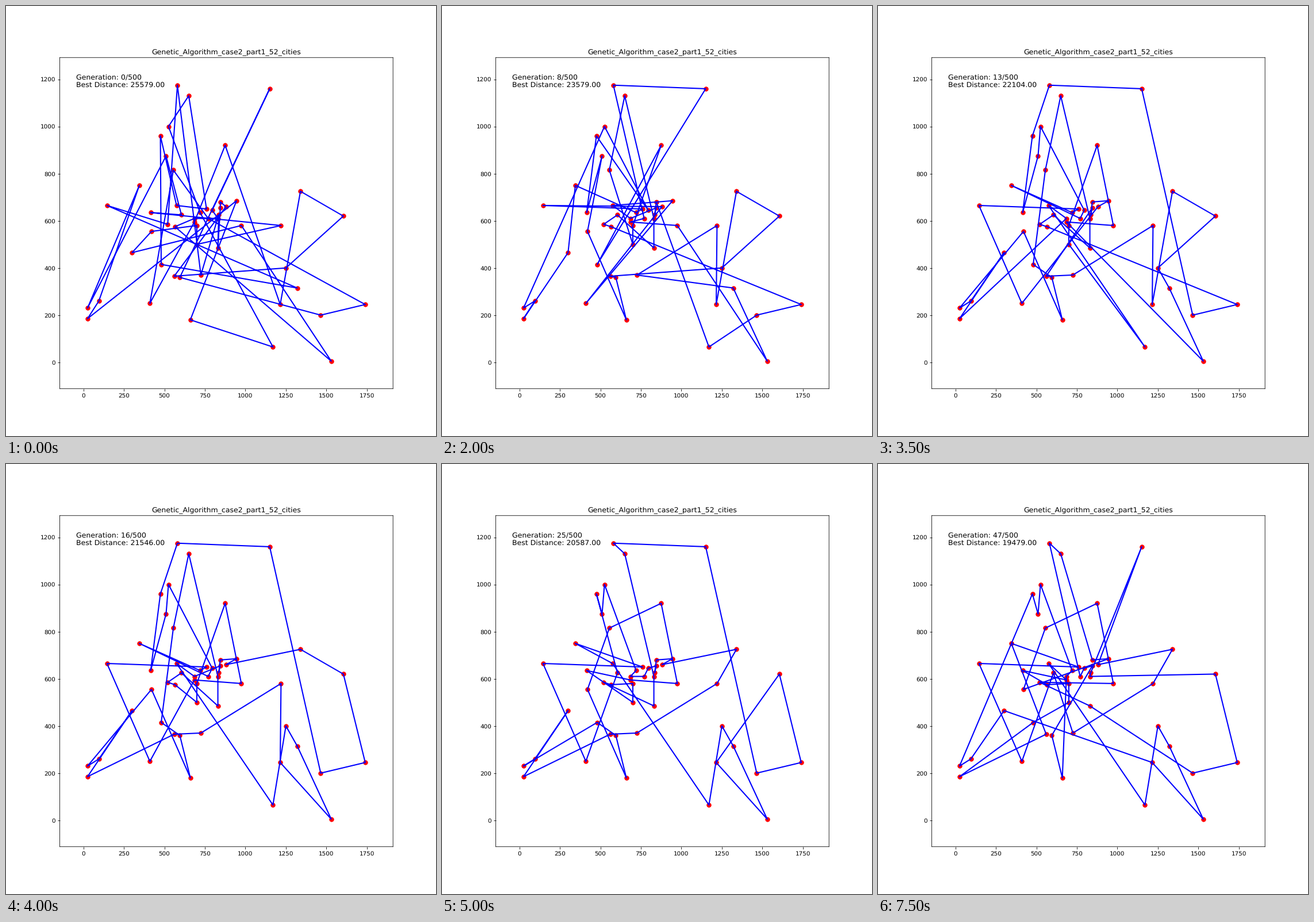
These frames come from a looping animation (748 px wide and 748 px high, 8 s). A matplotlib script:

```python
import numpy as np
import matplotlib.pyplot as plt
from matplotlib.animation import FuncAnimation

plt.rcParams.update({"path.snap": False, "text.hinting": "no_hinting"})

# Cities, listed in the order of the first route
X = np.array([
    725, 580, 520, 145, 1320, 480, 475, 575, 760, 650, 525, 720, 1170,
    660, 945, 25, 95, 345, 25, 510, 605, 415, 1220, 700, 700, 420,
    300, 975, 1530, 565, 685, 830, 795, 1150, 595, 1465, 1740, 770, 555,
    410, 685, 875, 1215, 1340, 1605, 1250, 560, 880, 845, 845, 830, 835])
Y = np.array([
    370, 1175, 585, 665, 315, 415, 960, 665, 650, 1130, 1000, 635, 65,
    180, 685, 185, 260, 750, 230, 875, 625, 635, 580, 500, 580, 555,
    465, 580, 5, 575, 610, 610, 645, 1160, 360, 200, 245, 610, 815,
    250, 595, 920, 245, 725, 620, 400, 365, 660, 680, 655, 485, 625])
N = len(X)
DIST = np.hypot(X[:, None] - X, Y[:, None] - Y)

first = list(range(N))
middle = [
    4, 28, 40, 27, 34, 13, 25, 19, 21, 6, 32, 10, 18, 16, 26, 15, 30, 7,
    14, 39, 47, 3, 8, 11, 17, 37, 1, 33, 35, 36, 29, 2, 20, 50, 31, 9,
    38, 5, 41, 24, 23, 12, 48, 51, 49, 46, 45, 44, 43, 42, 22, 0]
late = [
    11, 10, 19, 6, 18, 16, 26, 42, 28, 4, 45, 12, 7, 40, 21, 23, 24, 29,
    5, 15, 46, 17, 8, 3, 39, 20, 0, 22, 43, 47, 1, 9, 31, 44, 36, 35,
    50, 2, 27, 41, 38, 25, 14, 48, 51, 33, 37, 32, 49, 34, 13, 30]


def two_opt(route):
    """Yield (i, j, removed edges, added edges) for every reversal."""
    for i in range(1, N - 1):
        for j in range(i + 1, N):
            a, b, c, d = route[i - 1], route[i], route[j], route[(j + 1) % N]
            yield i, j + 1, ((a, b), (c, d)), ((a, c), (b, d))


def flip(route, i, j):
    return route[:i] + route[i:j][::-1] + route[j:]


def saving(old, new):
    return sum(DIST[e] for e in old) - sum(DIST[e] for e in new)


def morph(route, goal):
    """Reversals that bring in edges of the goal, up to the goal itself."""
    wanted = np.zeros((N, N), int)
    after = goal[1:] + goal[:1]
    wanted[goal, after] = wanted[after, goal] = 1
    steps = [route]
    while True:
        best, cut = 0, None
        for i, j, old, new in two_opt(route):
            gain = sum(wanted[e] for e in new) - sum(wanted[e] for e in old)
            score = 2000 * gain + saving(old, new)
            if gain > 0 and score > best:
                best, cut = score, (i, j)
        if cut is None:
            return steps + [goal]
        route = flip(route, *cut)
        steps.append(route)


def refine(route, amount=100):
    """The reversal that shortens the route by about the given amount."""
    i, j, _, _ = min(two_opt(route),
                     key=lambda m: abs(saving(m[2], m[3]) - amount))
    return flip(route, i, j)


def sample(steps, u):
    return steps[round(u * (len(steps) - 1))]


opening, closing = morph(first, middle), morph(middle, late)
routes = [sample(opening, k / 5) for k in range(5)]
routes += [sample(closing, (k / 7) ** 1.5) for k in range(8)]
for _ in range(3):
    routes.append(refine(routes[-1]))

KEYS = [0, 2, 5, 7, 9, 12, 15]
GENERATION = [0, 4, 10, 13, 20, 35, 47]
BEST = [25579, 24774, 22982, 22104, 20987, 19786, 19479]

fig, ax = plt.subplots(figsize=(10, 10), dpi=74.8)
pad_x, pad_y = 0.1 * np.ptp(X), 0.1 * np.ptp(Y)
ax.set_xlim(X.min() - pad_x, X.max() + pad_x)
ax.set_ylim(Y.min() - pad_y, Y.max() + pad_y)
ax.set_title("Genetic_Algorithm_case2_part1_52_cities")
ax.scatter(X, Y, s=50, c="red")
line, = ax.plot([], [], color="blue", lw=2)
label = ax.text(0.05, 0.95, "", transform=ax.transAxes, fontsize=12, va="top")


def draw(frame):
    loop = routes[frame] + routes[frame][:1]
    line.set_data(X[loop], Y[loop])
    gen = round(np.interp(frame, KEYS, GENERATION))
    best = round(np.interp(frame, KEYS, BEST))
    label.set_text(f"Generation: {gen}/500\nBest Distance: {best:.2f}")
    return line, label


anim = FuncAnimation(fig, draw, frames=len(routes), interval=500,
                     repeat=True, repeat_delay=0)
plt.show()
```
